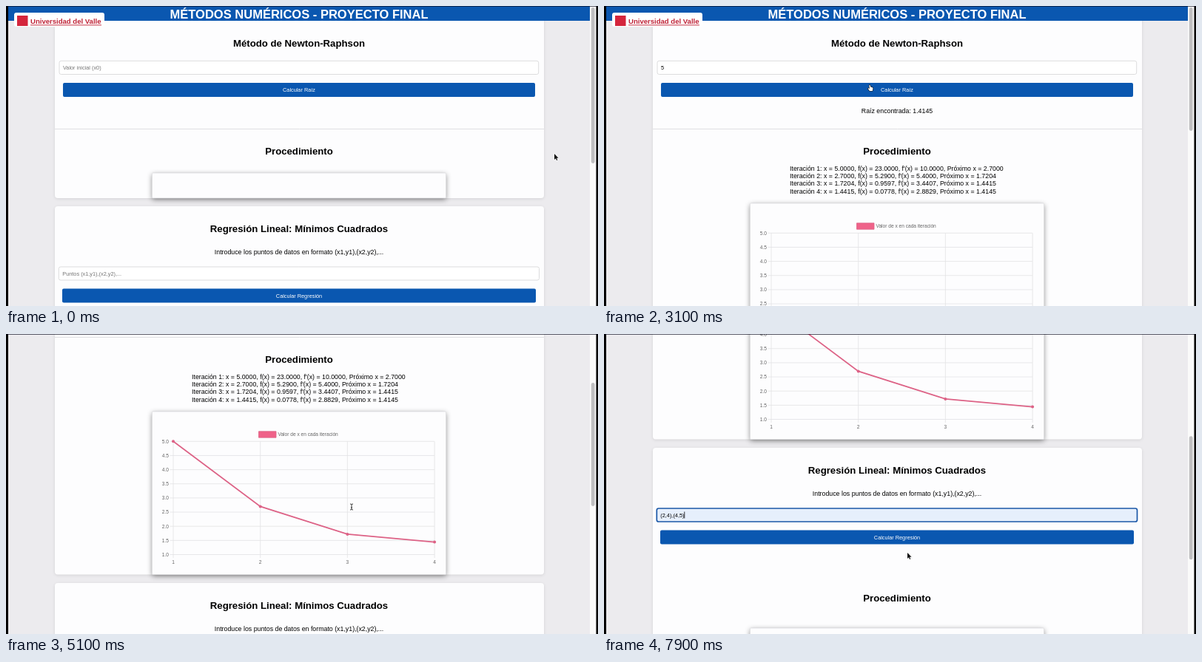
Write an HTML page with a canvas that moves like this. It is 800x406 px and loops after 8000 ms.

```html
<!DOCTYPE html>
<html lang="es">
<head>
<meta charset="utf-8">
<title>Métodos numéricos</title>
<style>
  html, body { margin: 0; width: 100%; height: 100%; overflow: hidden; background: #000; }
  canvas { display: block; }
</style>
</head>
<body>
<canvas id="stage" width="800" height="406"></canvas>
<script>
const ctx = document.getElementById('stage').getContext('2d');
const LOOP = 8000, STEP = 100;
const FOCUS_X0 = 1300, TYPE_X0 = 1800, SOLVE = 3050, FOCUS_POINTS = 6900, FILL_POINTS = 7200;
const BLUE = '#0a57b0', PINK = '#dd6286', CARD = '#fdfdfe';

// [time, scroll offset]
const scrollKeys = [[4100, 0], [4200, 18], [4600, 100], [5100, 162], [5400, 270], [5700, 332], [5900, 345]];
// [time, x, y]
const pointerKeys = [[0, 741, 200], [200, 725, 192], [700, 440, 105], [1100, 348, 83], [2400, 348, 83],
  [2900, 360, 111], [3300, 360, 111], [4000, 464, 238], [4200, 464, 238], [4500, 467, 234],
  [6000, 467, 234], [6700, 420, 244], [7400, 420, 244], [7800, 410, 296]];
// [time, pointer shape]
const shapeKeys = [[0, 'arrow'], [1100, 'beam'], [2700, 'hand'], [3400, 'arrow'], [4400, 'beam'],
  [7500, 'hand'], [7700, 'arrow']];

const iterations = [
  "Iteración 1: x = 5.0000, f(x) = 23.0000, f'(x) = 10.0000, Próximo x = 2.7000",
  "Iteración 2: x = 2.7000, f(x) = 5.2900, f'(x) = 5.4000, Próximo x = 1.7204",
  "Iteración 3: x = 1.7204, f(x) = 0.9597, f'(x) = 3.4407, Próximo x = 1.4415",
  "Iteración 4: x = 1.4415, f(x) = 0.0778, f'(x) = 2.8829, Próximo x = 1.4145"
];
const roots = [5, 2.7, 1.7204, 1.4415];

function along(keys, t) {
  const next = keys.findIndex(k => k[0] > t);
  if (next === 0) return keys[0].slice(1);
  if (next < 0) return keys[keys.length - 1].slice(1);
  const a = keys[next - 1], b = keys[next], u = (t - a[0]) / (b[0] - a[0]);
  return a.slice(1).map((v, i) => v + (b[i + 1] - v) * u);
}

function rect(x, y, w, h, fill) {
  ctx.fillStyle = fill;
  ctx.fillRect(x, y, w, h);
}

function panel(x, y, w, h, r, fill, stroke, lineWidth = 1) {
  ctx.beginPath();
  ctx.roundRect(x, y, w, h, r);
  ctx.fillStyle = fill;
  ctx.fill();
  if (!stroke) return;
  ctx.strokeStyle = stroke;
  ctx.lineWidth = lineWidth;
  ctx.stroke();
}

function shadowed(color, blur, dy, draw) {
  ctx.save();
  ctx.shadowColor = color;
  ctx.shadowBlur = blur;
  ctx.shadowOffsetY = dy;
  draw();
  ctx.restore();
}

// y is the middle of the capitals
function text(str, x, y, size, { color = '#000', align = 'left', bold = false } = {}) {
  ctx.font = `${bold ? 'bold ' : ''}${size}px "Liberation Sans", Arial, sans-serif`;
  ctx.fillStyle = color;
  ctx.textAlign = align;
  ctx.fillText(str, x, y + size * 0.36);
}

const heading = (str, y) => text(str, 396, y, 13.2, { align: 'center', bold: true });
const centered = (str, y) => text(str, 396, y, 8.8, { align: 'center' });

function line(x1, y1, x2, y2, color) {
  ctx.strokeStyle = color;
  ctx.lineWidth = 0.8;
  ctx.beginPath();
  ctx.moveTo(x1, y1);
  ctx.lineTo(x2, y2);
  ctx.stroke();
}

function input(x, y, w, h, value, placeholder, focused, filled, caret) {
  panel(x, y, w, h, 2.5, filled ? '#e6effc' : '#fff', focused ? '#1b58a8' : '#d8d8da', focused ? 1.7 : 0.9);
  text(value || placeholder, x + 5, y + h / 2 + 0.2, 7.33, { color: value ? '#000' : '#757575' });
  if (focused && caret) {
    const end = x + 5.3 + (value ? ctx.measureText(value).width : 0);
    line(end, y + 4.5, end, y + h - 4.5, '#000');
  }
}

function button(x, y, w, label, focused) {
  panel(x, y, w, 19, 2, BLUE, focused && '#083a86', 1.2);
  text(label, 396, y + 9.6, 7.33, { color: '#fff', align: 'center' });
}

function suggestion(y, value) {
  shadowed('rgba(0,0,0,.3)', 3, 1, () => panel(127, y, 86, 19, [0, 0, 3, 3], '#fff'));
  text(value, 133.5, y + 7.5, 7.33);
}

function chartBox(y, h) {
  shadowed('rgba(0,0,0,.45)', 7, 2, () => panel(197.5, y, 397, h, 1, CARD));
  panel(197.5, y, 397, h, 1, CARD, '#d6d6d8', 0.6);
}

function chart(progress) {
  const px = i => 226 + i * 117.7;
  const py = v => 460.5 - (v - 1) * 38.3;
  panel(341.5, 293.8, 23.5, 8.4, 0, '#ef6289', PINK, 0.8);
  text('Valor de x en cada iteración', 367.5, 298, 6.6, { color: '#666' });
  for (let v = 1; v <= 5; v += 0.5) {
    line(221.5, py(v), px(3), py(v), '#e3e3e5');
    text(v.toFixed(1), 220, py(v), 6.6, { color: '#666', align: 'right' });
  }
  roots.forEach((_, i) => {
    line(px(i), py(5), px(i), py(1) + 4.5, '#e3e3e5');
    text(i + 1, px(i), 471, 6.6, { color: '#666', align: 'center' });
  });
  const points = roots.map((v, i) => [px(i), py(1 + (v - 1) * progress)]);
  ctx.strokeStyle = ctx.fillStyle = PINK;
  ctx.lineWidth = 1.7;
  ctx.beginPath();
  points.forEach(p => ctx.lineTo(...p));
  ctx.stroke();
  points.forEach(([x, y]) => {
    ctx.beginPath();
    ctx.arc(x, y, 2, 0, 7);
    ctx.fill();
  });
}

function newtonCard(t, caret) {
  const solved = t >= SOLVE;
  shadowed('rgba(0,0,0,.1)', 4, 1, () => panel(66, 15, 661, solved ? 472.5 : 245, 4, CARD));
  heading('Método de Newton-Raphson', 50);
  const focused = t >= FOCUS_X0 && t < SOLVE;
  input(72, 74.3, 647.7, 18.2, t >= TYPE_X0 ? '5' : '', 'Valor inicial (x0)', focused, false, caret);
  button(77, 104, 638, 'Calcular Raíz', t >= 3300 && t < FOCUS_POINTS);
  if (t >= FOCUS_X0 && t < TYPE_X0) suggestion(103, '5');
  line(66, 166.5, 727, 166.5, '#d9d9db');
  heading('Procedimiento', 196.3);
  if (!solved) return chartBox(226, 34);
  centered('Raíz encontrada: 1.4145', 142);
  iterations.forEach((row, i) => text(row, 251, 219.8 + i * 10.25, 8.8));
  chartBox(267, 220.5);
  chart(1 - (1 - Math.min(1, (t - SOLVE) / 1000)) ** 4);
}

function regressionCard(t, caret) {
  shadowed('rgba(0,0,0,.1)', 4, 1, () => panel(66, 271, 661, 400, 4, CARD));
  heading('Regresión Lineal: Mínimos Cuadrados', 301);
  centered('Introduce los puntos de datos en formato (x1,y1),(x2,y2),...', 333);
  const filled = t >= FILL_POINTS;
  input(71.3, 353, 649.2, 18, filled ? '(2,4),(4,5)' : '', 'Puntos (x1,y1),(x2,y2),...',
    t >= FOCUS_POINTS, filled, caret);
  button(76, 382.5, 640, 'Calcular Regresión');
  if (t >= FOCUS_POINTS && !filled) suggestion(381.5, '(2,4),(4,5)');
  heading('Procedimiento', 474);
  chartBox(515, 34);
}

function header() {
  rect(3, 0, 786, 20, BLUE);
  text('MÉTODOS NUMÉRICOS - PROYECTO FINAL', 396, 10.6, 16.53, { color: '#fff', align: 'center', bold: true });
  panel(11, 9, 122, 19, 3, '#fff');
  rect(15, 13, 14.5, 14, '#d4253c');
  text('Universidad del Valle', 33, 20.8, 9.55, { color: '#bf2136', bold: true });
  rect(33, 25.4, 96, 0.9, '#bf2136');
}

const arrow = new Path2D('M0 0V8L1.9 6.3L3.1 9L4.3 8.5L3.1 5.8H5.6Z');
const beam = new Path2D('M-2 -4Q0 -4 0 -3Q0 -4 2 -4M0 -3V3M-2 4Q0 4 0 3Q0 4 2 4M-1 1H1');
const hand = new Path2D('M-1.6 -4Q-.8 -4.6 -.3 -3.6L.2 -1.4L2.8 -.8Q3.6 -.4 3.4 1L2.8 4H-1L-3.4 .8Q-3.2 -.2 -2 .6L-1.2 1Z');

function pointer(t) {
  const [x, y] = along(pointerKeys, t);
  const shape = shapeKeys.filter(k => k[0] <= t).pop()[1];
  ctx.save();
  ctx.translate(x, y);
  ctx.lineJoin = 'round';
  if (shape === 'beam') {
    ctx.strokeStyle = '#fff';
    ctx.lineWidth = 2;
    ctx.stroke(beam);
    ctx.strokeStyle = '#222';
    ctx.lineWidth = 0.9;
    ctx.stroke(beam);
  } else {
    const isArrow = shape === 'arrow';
    ctx.strokeStyle = isArrow ? '#fff' : '#111';
    ctx.fillStyle = isArrow ? '#111' : '#fff';
    ctx.lineWidth = isArrow ? 1.4 : 1.2;
    ctx.stroke(isArrow ? arrow : hand);
    ctx.fill(isArrow ? arrow : hand);
  }
  ctx.restore();
}

function draw(t) {
  const solved = t >= SOLVE;
  const [scroll] = along(scrollKeys, t);
  const caret = Math.floor((t - FOCUS_X0) / 500) % 2 === 0 || t >= 7600;
  rect(0, 0, 800, 406, '#000');
  rect(3, 0, 786, 406, '#ecebee');
  ctx.save();
  ctx.beginPath();
  ctx.rect(3, 0, 786, 406);
  ctx.clip();
  ctx.translate(0, -scroll);
  ctx.save();
  ctx.translate(0, solved ? 228 : 0);
  regressionCard(t, caret);
  ctx.restore();
  newtonCard(t, caret);
  header();
  ctx.restore();
  rect(789, 0, 8.5, 406, '#fafafa');
  panel(790.8, 2 + scroll * 0.395, 4.8, solved ? 167 : 211, 2.4, '#bfbfc1');
  rect(0, 0, 800, 1, 'rgba(10,12,30,.65)');
  pointer(t);
}

function tick(now) {
  draw(Math.floor(now % LOOP / STEP) * STEP);
  requestAnimationFrame(tick);
}
requestAnimationFrame(tick);
</script>
</body>
</html>
```
